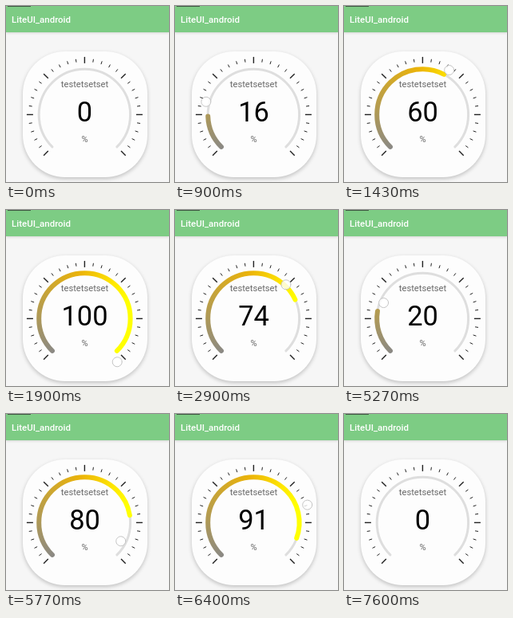
Write an HTML page with a canvas that moves like this. It is 204x221 px and loops after 7.81 s.

```html
<!DOCTYPE html>
<html lang="en">
<head>
<meta charset="utf-8">
<title>Gauge</title>
<style>
  html, body { margin: 0; width: 204px; height: 221px; overflow: hidden; background: #f6f6f6; }
  body { position: relative; font-family: Roboto, sans-serif; }
  header {
    position: absolute; inset: 0 0 auto; height: 33px;
    background: #7dcc84; box-shadow: 0 1px 3px rgba(0, 0, 0, .14);
  }
  header::before { content: ""; position: absolute; left: 2px; top: 0; width: 29px; height: 1px; background: #3f5942; }
  .card {
    position: absolute; left: 21px; top: 57px; width: 156px; height: 158px;
    border-radius: 53px; background: #fdfdfd; box-shadow: 0 2px 5px rgba(0, 0, 0, .22);
  }
  canvas { position: absolute; left: 0; top: 0; width: 204px; height: 221px; }
</style>
</head>
<body>
<header></header>
<div class="card"></div>
<canvas id="stage"></canvas>
<script>
const LOOP = 7810, LAG = 70, FADE = 140;
const CX = 98.4, CY = 136.4, R = 57.2;
const START = Math.PI * 0.75, SWEEP = Math.PI * 1.5;

// Finger drags: start point, then moves as [start, duration, percent, radius]
const drags = [
  { down: 570, from: [3, 60], moves: [
    [570, 860, 61.4, 65], [1430, 470, 103, 68], [1900, 230, 110.6, 81]
  ] },
  { down: 2500, from: [99, 57], moves: [
    [2500, 700, 45, 60], [3330, 270, 15, 61], [3830, 170, 30, 64],
    [4230, 170, 5, 60], [4600, 250, -5, 76], [4850, 500, 27, 51],
    [5400, 470, 102, 51], [5900, 200, 103, 68], [6200, 630, -7, 80]
  ] }
];
for (const drag of drags) {
  const [start, length] = drag.moves[drag.moves.length - 1];
  drag.up = start + length + FADE;
}

const canvas = document.getElementById("stage");
const dpr = Math.max(1, window.devicePixelRatio || 1);
canvas.width = 204 * dpr;
canvas.height = 221 * dpr;
const ctx = canvas.getContext("2d");
ctx.scale(dpr, dpr);
ctx.lineCap = "round";

const sweep = ctx.createConicGradient(START - 0.1, CX, CY);
[[0, "#888"], [.38, "#ecb408"], [.5, "#ffe800"], [.58, "#ff0"], [.8, "#ff0"], [1, "#888"]]
  .forEach(([at, color]) => sweep.addColorStop(at, color));

const angleOf = percent => START + SWEEP * percent / 100;
const clamp = (v, max) => Math.min(max, Math.max(0, v));
const ease = k => k * k * (3 - 2 * k);
const dragAt = t => drags.filter(drag => drag.down <= t).pop();

function fingerAt(drag, t) {
  let [percent, r] = drag.from;
  for (const [start, length, toPercent, toR] of drag.moves) {
    const k = ease(clamp((t - start) / length, 1));
    percent += (toPercent - percent) * k;
    r += (toR - r) * k;
  }
  return [percent, r];
}

function progressAt(t) {
  const drag = dragAt(t - LAG);
  return drag ? clamp(fingerAt(drag, t - LAG)[0], 100) : 0;
}

function text(str, x, y, font, color, align = "center") {
  ctx.font = font + " Roboto, sans-serif";
  ctx.fillStyle = color;
  ctx.textAlign = align;
  ctx.fillText(str, x, y);
}

function arc(percent, width, color) {
  ctx.beginPath();
  ctx.arc(CX, CY, R, START, angleOf(percent));
  ctx.lineWidth = width;
  ctx.strokeStyle = color;
  ctx.stroke();
}

function ticks() {
  ctx.save();
  ctx.lineCap = "butt";
  ctx.strokeStyle = "#222";
  for (let i = 0; i <= 30; i++) {
    const major = i % 5 === 0;
    const half = major ? 4 : 2;
    const a = angleOf(i / 0.3), c = Math.cos(a), s = Math.sin(a);
    ctx.lineWidth = major ? 1.4 : 1;
    ctx.beginPath();
    ctx.moveTo(CX + c * (68.5 - half), CY + s * (68.5 - half));
    ctx.lineTo(CX + c * (68.5 + half), CY + s * (68.5 + half));
    ctx.stroke();
  }
  ctx.restore();
}

function touchDot(t) {
  const drag = dragAt(t);
  if (!drag || t >= drag.up) return;
  const [percent, r] = fingerAt(drag, t), a = angleOf(percent);
  ctx.save();
  ctx.globalAlpha = t < drag.up - FADE / 2 ? 1 : 0.5;
  ctx.beginPath();
  ctx.arc(CX + Math.cos(a) * r, CY + Math.sin(a) * r, 6, 0, Math.PI * 2);
  ctx.fillStyle = "rgba(255, 255, 255, .8)";
  ctx.fill();
  ctx.lineWidth = 1;
  ctx.strokeStyle = "#c4c4c4";
  ctx.stroke();
  ctx.restore();
}

function draw(t) {
  const progress = progressAt(t);
  ctx.clearRect(0, 0, 204, 221);
  text("LiteUI_android", 7, 20.5, "500 11.5px", "#fff", "left");
  ticks();
  arc(100, 3, "#dedede");
  if (progress > 0) arc(progress, 6, sweep);
  text("testetsetset", 98.5, 102, "11.2px", "#686868");
  text(Math.round(progress), 98.5, 145, "34.4px", "#000");
  text("%", 98.5, 171, "11px", "#686868");
  touchDot(t);
}

const begin = performance.now();
function frame() {
  draw((performance.now() - begin) % LOOP);
  requestAnimationFrame(frame);
}
frame();
</script>
</body>
</html>
```
